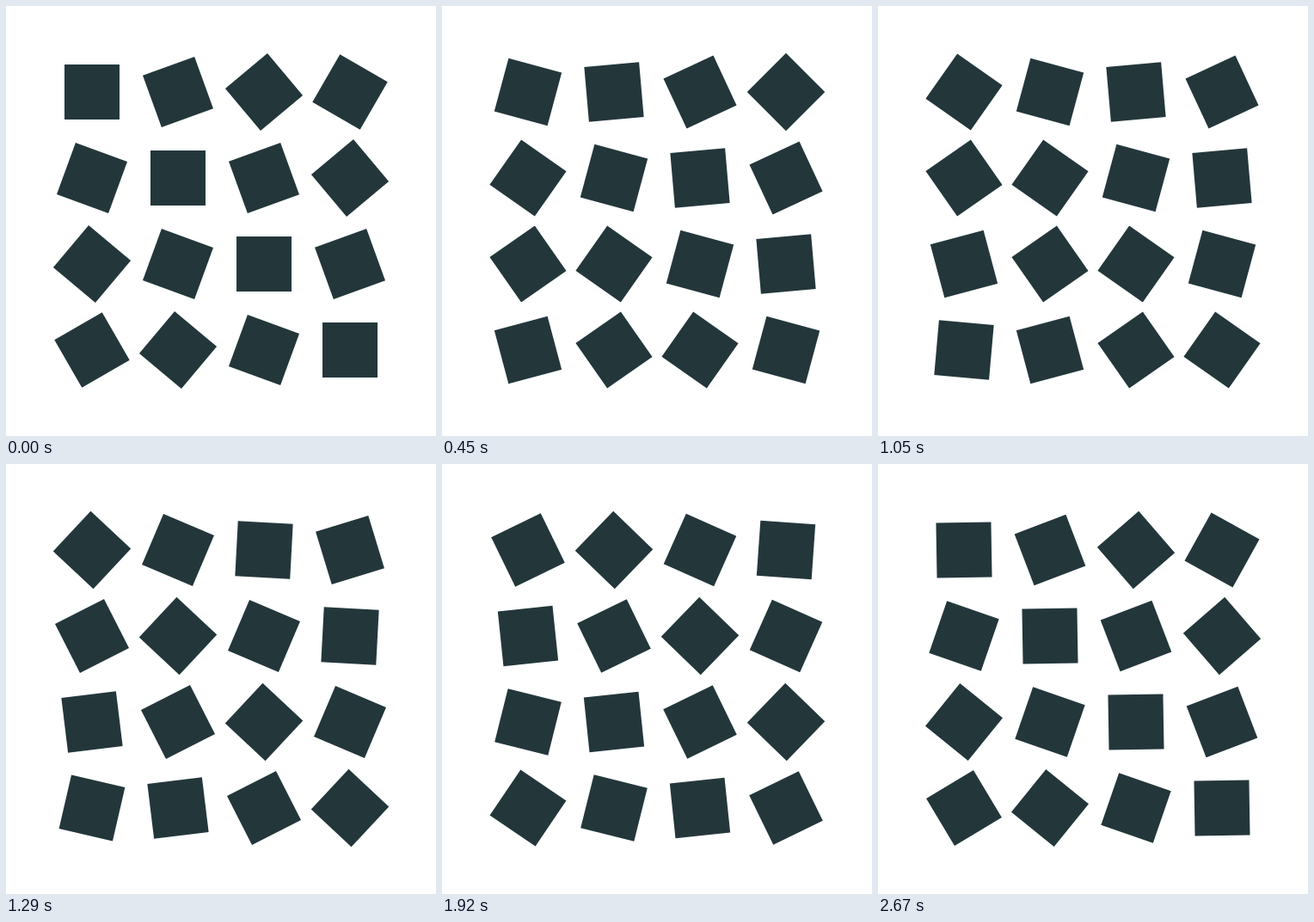
Animation, 500 px wide and 500 px high, one loop 2700 ms. Source, as an HTML page:

```html
<!DOCTYPE html>
<html lang="en">
<head>
<meta charset="utf-8">
<title>Turning squares</title>
<style>
  html, body { margin: 0; width: 100%; height: 100%; overflow: hidden; background: #fff; }
  svg { display: block; width: 100%; height: 100%; }
  rect { fill: #23373b; shape-rendering: crispEdges; transform-box: fill-box; transform-origin: center; }
</style>
</head>
<body>
<svg viewBox="0 0 500 500"></svg>
<script>
  const LOOP = 2700, SIZE = 64, PITCH = 100, COUNT = 4, LAG = 20;
  const svg = document.querySelector('svg');

  function addSquare(col, row) {
    const rect = document.createElementNS(svg.namespaceURI, 'rect');
    const attrs = {
      x: (col + 1) * PITCH - SIZE / 2,
      y: (row + 1) * PITCH - SIZE / 2,
      width: SIZE,
      height: SIZE
    };
    for (const name in attrs) rect.setAttribute(name, attrs[name]);
    svg.append(rect);

    // A quarter turn brings a square back to its starting look.
    const start = LAG * (row - col);
    rect.animate(
      [{ transform: `rotate(${start}deg)` }, { transform: `rotate(${start + 90}deg)` }],
      { duration: LOOP, iterations: Infinity, easing: 'linear' }
    );
  }

  for (let row = 0; row < COUNT; row++)
    for (let col = 0; col < COUNT; col++) addSquare(col, row);
</script>
</body>
</html>
```
